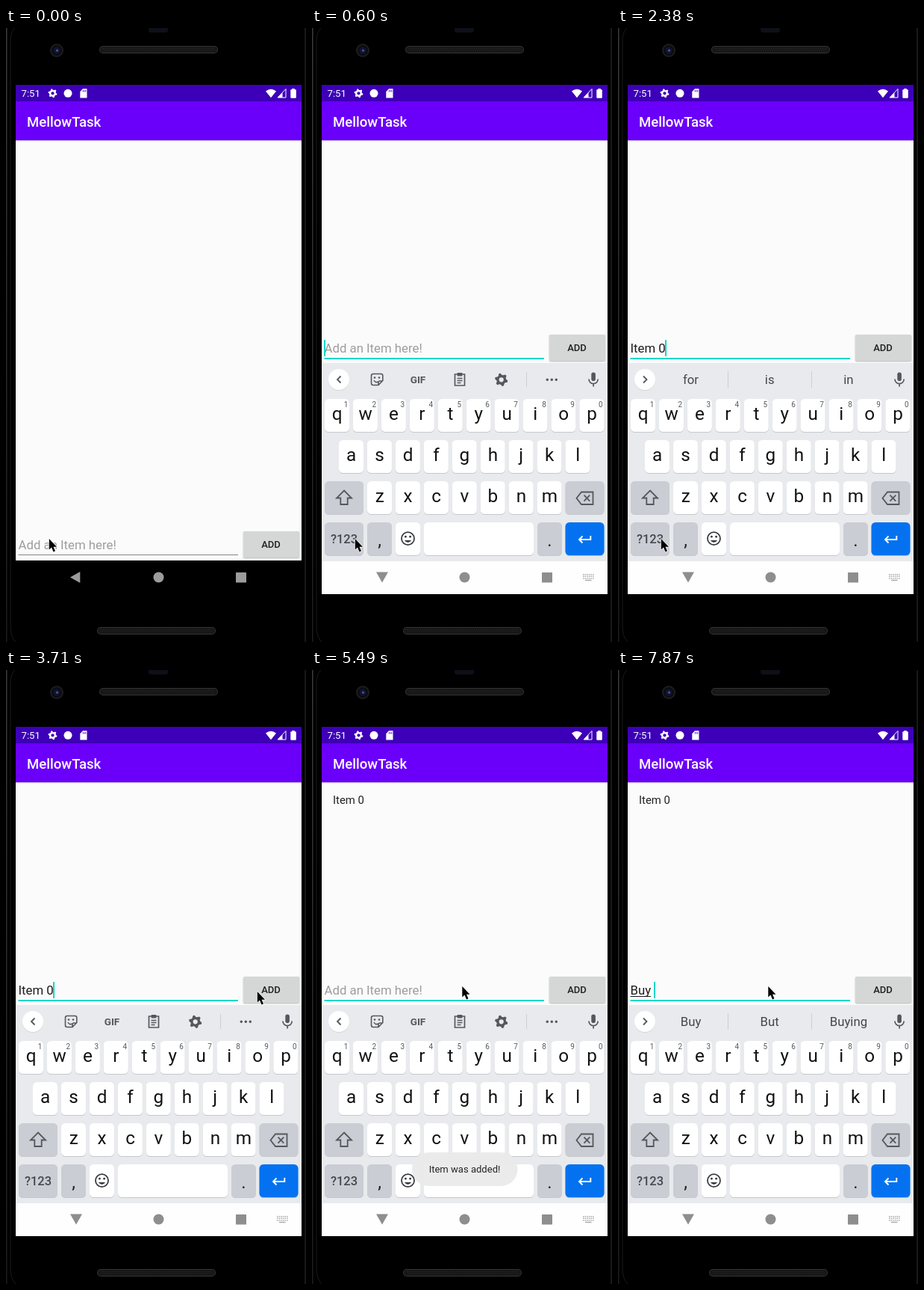
These frames come from a looping animation (402x821 px, 8000 ms). An HTML page with a canvas:

```html
<!DOCTYPE html>
<html lang="en">
<head>
<meta charset="utf-8">
<title>To-do app demo</title>
<style>
  html, body { margin: 0; width: 100%; height: 100%; overflow: hidden; background: #000; }
  canvas { display: block; width: 402px; height: 821px; }
</style>
</head>
<body>
<canvas id="stage"></canvas>
<script>
const W = 402, H = 821, LOOP = 8000;
const canvas = document.getElementById('stage');
const dpr = window.devicePixelRatio || 1;
canvas.width = Math.round(W * dpr);
canvas.height = Math.round(H * dpr);
const c = canvas.getContext('2d');

const TEAL = '#08d9c6', ICON = '#54585d', PAPER = '#fbfbfb';

// Each entry changes only the listed properties and holds until the next one.
const states = [
  [0, { text: '', caret: false, focus: false, keyboard: null, words: null, upper: false,
        underline: false, pressed: false, item: false, toast: 0 }],
  [150, { focus: true, caret: true }],
  [300, { keyboard: 150 }],
  [450, { keyboard: 18 }],
  [600, { keyboard: 0 }],
  [740, { caret: false }],
  [1040, { caret: true, upper: true }],
  [1190, { text: 'I', underline: true, words: ['I', "I'm", "I'll"] }],
  [1340, { text: 'It', upper: false }],
  [1480, { text: 'Ite', words: ['It', 'Its', "It's"] }],
  [1630, { text: 'Item', words: ['Ite', 'Item', 'Items'] }],
  [1780, { words: ['Item', 'Items', 'itemized'] }],
  [2230, { text: 'Item ', underline: false, words: ['for', 'is', 'in'] }],
  [2380, { text: 'Item 0' }],
  [2670, { words: null }],
  [2970, { caret: false }],
  [3410, { caret: true }],
  [3860, { pressed: true }],
  [4010, { text: '', item: true }],
  [4160, { toast: 0.5 }],
  [4310, { toast: 1, pressed: false }],
  [4460, { caret: false }],
  [4900, { caret: true }],
  [5340, { caret: false }],
  [5940, { text: 'B', caret: true, underline: true }],
  [6090, { text: 'Bu', words: ['But', 'By', 'Being'] }],
  [6230, { text: 'But', toast: 0.4 }],
  [6380, { toast: 0, words: ['But', 'Buy', 'Bit'] }],
  [6680, { text: 'But ', underline: false, words: ['you', 'I', "I'm"] }],
  [6830, { text: 'But', underline: true }],
  [6980, { words: ['Nut', 'But', 'Bit'] }],
  [7280, { text: 'Bu' }],
  [7420, { words: ['Bus', 'But', 'Bud'] }],
  [7720, { text: 'Buy', words: ['Buy', 'But', 'Buying'] }],
  [7870, { text: 'Buy ' }]
];

const pointer = [
  [0, 57, 683], [2820, 90, 660], [2970, 170, 590], [3110, 260, 500], [3260, 325, 450],
  [3410, 350, 433], [3560, 340, 431], [3710, 336, 430],
  [4900, 320, 429], [5050, 280, 427], [5200, 235, 425], [5340, 208, 423], [5490, 200.5, 423]
];

function stateAt(t) {
  return Object.assign({}, ...states.filter(s => s[0] <= t).map(s => s[1]));
}

function rect(x, y, w, h, color, r = 0) {
  c.fillStyle = color;
  c.beginPath();
  c.roundRect(x, y, w, h, r);
  c.fill();
}

function disc(x, y, r, color) {
  c.fillStyle = color;
  c.beginPath();
  c.arc(x, y, r, 0, Math.PI * 2);
  c.fill();
}

function shape(d, fill, stroke, width = 1.8) {
  const p = new Path2D(d);
  if (fill) { c.fillStyle = fill; c.fill(p); }
  if (stroke) { c.strokeStyle = stroke; c.lineWidth = width; c.stroke(p); }
}

function label(str, x, y, size, color, align = 'left', weight = 400) {
  c.font = `${weight} ${size}px Roboto, sans-serif`;
  c.fillStyle = color;
  c.textAlign = align;
  c.fillText(str, x, y);
  return c.measureText(str).width;
}

function gear(x, y, r, color) {
  c.fillStyle = color;
  c.beginPath();
  for (let i = 0; i < 24; i++) {
    const a = (i + 0.5) * Math.PI / 12;
    const d = i % 4 < 2 ? r : r * 0.74;
    c.lineTo(x + d * Math.cos(a), y + d * Math.sin(a));
  }
  c.closePath();
  c.moveTo(x + r * 0.36, y);
  c.arc(x, y, r * 0.36, 0, Math.PI * 2);
  c.fill('evenodd');
}

function speaker(x, y) {
  rect(x, y, 159, 10, '#343434', 5);
  rect(x + 1, y + 1, 157, 8, '#171717', 4);
  for (let i = 0; i < 50; i++) {
    for (let j = 0; j < 2; j++) rect(x + 5 + i * 3 + j * 1.5, y + 3 + j * 2.5, 1, 1, '#2d2d2d');
  }
}

function drawPhone() {
  rect(0, 0, W, H, '#000');
  const edge = c.createLinearGradient(0, 0, 0, H);
  edge.addColorStop(0, '#3a3a3a');
  edge.addColorStop(1, '#1c1c1c');
  rect(0, 0, 1.5, H, edge);
  rect(400, 0, 2, H, '#191919');
  shape('M12 0Q6 6 6 16V800Q6 814 13 821', null, '#1b1b1b', 1);
  rect(191, -4, 26, 10, '#0e1019', 3);
  speaker(125, 24);
  speaker(122, 801);
  disc(68, 30, 9, '#1d1d20');
  disc(68, 30, 7, '#0b0c12');
  disc(68, 30, 4.5, '#11152f');
  disc(68.5, 30, 1.6, '#4a5896');
}

function drawBars() {
  rect(13, 76, 383, 23, '#3d00b8');
  rect(13, 98, 383, 52, '#6a00f9');
  rect(13, 150, 383, 1, '#c4b4dc');
  rect(13, 151, 383, 1, '#efedf1');
  label('7:51', 20.5, 92, 13.2, '#fff');
  gear(62.5, 87.3, 6, '#fff');
  disc(83, 87.3, 5.5, '#fff');
  shape('M103 81.3H108.5V93.5H99.3V85Z', '#fff');
  shape('M103.2 83V85.5M105 83V85.5M106.8 83V85.5', null, '#3d00b8', 0.8);
  shape('M348 84.5Q355 79 362 84.5L355 93.3Z', '#fff');
  shape('M375 81.5V93H364Z', null, '#fff', 1);
  shape('M370.5 86.3V93H364Z', '#fff');
  rect(381.3, 82.3, 7.5, 11.5, '#fff', 1);
  rect(383.3, 81, 3.5, 2, '#fff');
  label('MellowTask', 28, 131.5, 18.6, '#fff', 'left', 500);
}

function drawEntry(s, y) {
  let caretX = 16;
  if (s.text) {
    caretX += Math.round(label(s.text, 16.5, y + 24, 16.77, '#1c1c1c'));
    if (s.underline) rect(16.5, y + 26, c.measureText(s.text.trim()).width, 1, '#1c1c1c');
  } else {
    label('Add an Item here!', 16.5, y + 24, 16.77, '#9d9d9d');
  }
  if (s.caret) rect(caretX, y + 7, 2, 22, TEAL);
  if (s.focus) rect(16.5, y + 31, 294.5, 2, TEAL);
  else rect(16.5, y + 31, 294.5, 1, '#858585');

  c.save();
  c.shadowColor = 'rgba(0,0,0,.28)';
  c.shadowBlur = (s.pressed ? 4 : 2) * dpr;
  c.shadowOffsetY = dpr;
  rect(318, y, 75, 35, s.pressed ? '#c3c4c4' : '#d5d6d6', 2);
  c.restore();
  label('ADD', 355, y + 22, 13.05, '#202020', 'center', 500);
}

function key(x, y, w, color = '#fff', shade = '#c5c8cc') {
  rect(x, y + 1, w, 44, shade, 5.5);
  rect(x, y, w, 44, color, 5.5);
}

function letterRow(letters, x, y, upper, digits) {
  [...letters].forEach((ch, i) => {
    const left = x + i * 37.93;
    key(left, y, 33);
    label(upper ? ch.toUpperCase() : ch, left + 16.7, y + 28.3, 24.3, '#121212', 'center');
    if (digits) label((i + 1) % 10, left + 28.5, y + 11, 10, '#55585c', 'center');
  });
}

function drawToolbar(words) {
  disc(36, 471, 14, '#d3d6da');
  disc(36, 470, 14, '#fff');
  shape(words ? 'M34 465.5L38.5 470L34 474.5' : 'M38.5 465.5L34 470L38.5 474.5', null, ICON);
  rect(374.3, 460.5, 5.6, 11.5, ICON, 2.8);
  shape('M371 469.5A6.1 6.1 0 0 0 383.2 469.5M377.1 475.5V479.5', null, ICON, 1.7);

  if (words) {
    words.forEach((word, i) => label(word, 97.5 + i * 105.7, 476.3, 16.77, '#43474b', 'center'));
    rect(147, 459, 1, 22, '#cbced2');
    rect(259, 459, 1, 22, '#cbced2');
    return;
  }
  shape('M82 462.5H92.5Q94.8 462.5 94.8 465V471.5L89 477.5H82Q79.5 477.5 79.5 475V465Q79.5 462.5 82 462.5Z'
    + 'M94.5 472H91Q89 472 89 474V477M83 471Q85 475 88.5 473', null, ICON, 1.6);
  disc(84, 467.5, 1.3, ICON);
  disc(90, 467.5, 1.3, ICON);
  label('GIF', 142, 474.8, 13.5, ICON, 'center', 700);
  shape('M191.5 463H204.5V478H191.5Z', null, ICON, 1.7);
  rect(194.5, 461, 7, 4.5, ICON, 1);
  shape('M194.5 468.5H201.5M194.5 471.5H201.5M194.5 474.5H199.5', null, ICON, 1.3);
  gear(253.7, 470.3, 8.7, ICON);
  rect(287, 460, 1, 20, '#cbced2');
  for (let i = -1; i < 2; i++) disc(321.3 + i * 6, 470.3, 1.7, ICON);
}

function drawKeyboard(s) {
  const gray = '#cacdd3';
  rect(13, 448, 383, 265, '#e8eaed');
  drawToolbar(s.words);
  letterRow('qwertyuiop', 17, 496, s.upper, true);
  letterRow('asdfghjkl', 36, 551, s.upper);
  letterRow('zxcvbnm', 74, 606, s.upper);

  key(17, 606, 52, gray);
  shape('M43 618.5L53 628.5H47.7V637H38.3V628.5H33Z', s.upper ? ICON : null, ICON, 1.8);
  key(339.5, 606, 52, gray);
  shape('M361 620.5H376.5V637H361L354.5 628.7ZM364.5 624.7L372.3 632.7M372.3 624.7L364.5 632.7',
    null, ICON, 1.8);

  key(17, 661, 52, gray);
  label('?123', 43, 689, 16.5, '#45494e', 'center', 500);
  key(74, 661, 33, gray);
  label(',', 90.7, 692.5, 24, '#222', 'center');
  key(112, 661, 33);
  c.strokeStyle = '#393c40';
  c.lineWidth = 1.8;
  c.beginPath();
  c.arc(128.5, 682.7, 8.5, 0, Math.PI * 2);
  c.stroke();
  disc(125.4, 680.2, 1.4, '#393c40');
  disc(131.6, 680.2, 1.4, '#393c40');
  shape('M123.8 685Q128.5 691 133.2 685Z', '#393c40');
  key(150, 661, 147);
  key(302, 661, 33, gray);
  label('.', 318.3, 692.5, 24, '#222', 'center');
  key(339.5, 661, 52, '#0472f0', '#9dbbe4');
  shape('M373.3 679V684H358.5M362.5 679.5L358 684L362.5 688.5', null, '#fff', 1.9);
}

function drawNav(open) {
  const color = open ? '#8e8e8e' : '#9c9c9c';
  if (open) rect(13, 713, 383, 44, '#fefefe');
  else rect(13, 712, 383, 45, '#000');
  shape(open ? 'M86 727.5H102L94 741.5Z' : 'M99.3 727V742L86 734.5Z', color);
  disc(204.5, 734.5, 7, color);
  rect(308, 728, 14, 13.5, color, 0.5);
  if (open) {
    for (let row = 0; row < 3; row++) {
      for (let i = 0; i < 6; i++) rect(363 + i * 2.6, 730 + row * 2.6, 1.5, 1.5, '#a9a9a9');
    }
    rect(366, 737.8, 8.5, 1.4, '#a9a9a9');
  }
}

function drawToast(alpha) {
  c.save();
  c.globalAlpha = alpha;
  rect(134, 645, 141.5, 45, 'rgba(235,235,236,.96)', 22.5);
  label('Item was added!', 204.5, 672, 13.05, '#252525', 'center');
  c.restore();
}

function drawPointer(x, y) {
  const arrow = 'M0.8 0V14.5L4 11.6L6.5 17.4L9 16.3L6.5 10.8H11Z';
  c.save();
  c.translate(x, y);
  c.lineJoin = 'round';
  shape(arrow, null, '#fff', 1.3);
  shape(arrow, '#000');
  c.restore();
}

function draw(t) {
  const s = stateAt(t);
  const open = s.keyboard !== null;
  c.setTransform(dpr, 0, 0, dpr, 0, 0);
  drawPhone();
  rect(13, 151, 383, 562, PAPER);
  drawBars();
  if (s.item) label('Item 0', 28, 178.5, 14.9, '#222');
  drawEntry(s, open ? 410 : 673);
  if (open) {
    c.save();
    c.beginPath();
    c.rect(13, 448, 383, 265);
    c.clip();
    c.translate(0, s.keyboard);
    drawKeyboard(s);
    c.restore();
  }
  drawNav(open);
  if (s.toast) drawToast(s.toast);
  const [, x, y] = pointer.filter(p => p[0] <= t).pop();
  drawPointer(x, y);
}

const start = performance.now();
function tick() {
  draw((performance.now() - start) % LOOP);
  requestAnimationFrame(tick);
}
tick();
</script>
</body>
</html>
```
